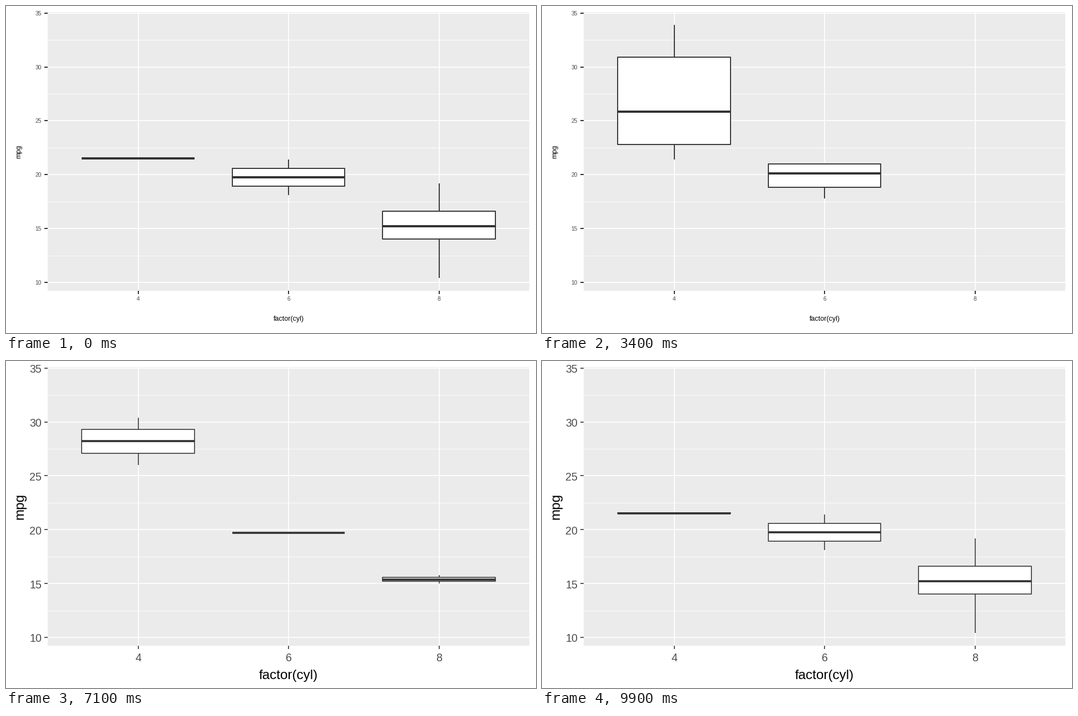
These frames come from a looping animation (953 by 588 pixels, 10000 ms). A matplotlib script:

```python
import math

import matplotlib.pyplot as plt
from matplotlib.animation import FuncAnimation
from matplotlib.patches import Rectangle

W, H, DPI = 953, 588, 100
FRAMES, INTERVAL = 100, 100
LEFT, TOP, RIGHT, BOTTOM = 75.3, 11.3, 940.8, 512.2
STEP = (RIGHT - LEFT) / 3.2
UNIT = 19.38
HALF_BOX = 0.375 * STEP
DARK = "#333333"

# Five-number summaries per gear state: min, lower, median, upper, max.
GEAR3 = {4: [21.5] * 5,
         6: [18.1, 18.925, 19.75, 20.575, 21.4],
         8: [10.4, 14.05, 15.2, 16.625, 19.2]}
GEAR4 = {4: [21.4, 22.8, 25.85, 30.9, 33.9],
         6: [17.8, 18.85, 20.1, 21.0, 21.0]}
GEAR5 = {4: [26.0, 27.1, 28.2, 29.3, 30.4],
         6: [19.7] * 5,
         8: [15.0, 15.2, 15.4, 15.6, 15.8]}
# start frame, length, from, to
TRANSITIONS = [(11, 22, GEAR3, GEAR4),
               (45, 22, GEAR4, GEAR5),
               (79, 21, GEAR5, GEAR3)]
FADE_END = 10 / 22

# Frames drawn in the compact theme; the rest use the large one.
COMPACT = {0, 1, 3, 4, 6, 7, 9, 11, 12, 13, 15, 16, 18, 20, 22,
           25, 28, 31, 34, 38, 45, 70, 95}


def px(size):
    return size * 72 / DPI


def x_at(cyl):
    return LEFT + (0.6 + (cyl - 4) / 2) * STEP


def y_at(mpg):
    return BOTTOM - (mpg - 9.225) * UNIT


def mix(a, b, p):
    return [u + (v - u) * p for u, v in zip(a, b)]


def state_at(frame):
    """Return {cyl: (summary, alpha)} for the frame."""
    current = GEAR3
    for start, length, old, new in TRANSITIONS:
        if frame < start:
            break
        t = (frame - start) / length
        if t >= 1:
            current = new
            continue
        p = (1 - math.cos(math.pi * t)) / 2
        boxes = {}
        for cyl in (4, 6, 8):
            if cyl not in new:      # shrink away to the median
                boxes[cyl] = mix(old[cyl], [old[cyl][2]] * 5, p), 1
            elif cyl not in old:    # fade in
                boxes[cyl] = new[cyl], (p if t < FADE_END else 1)
            else:
                boxes[cyl] = mix(old[cyl], new[cyl], p), 1
        return boxes
    return {cyl: (summary, 1) for cyl, summary in current.items()}


plt.rcParams["font.family"] = "Liberation Sans"
# The tiny margin keeps the pixel size from being rounded down.
fig = plt.figure(figsize=((W + 0.01) / DPI, (H + 0.01) / DPI), dpi=DPI,
                 facecolor="white")
ax = fig.add_axes([0, 0, 1, 1])
ax.set_xlim(0, W)
ax.set_ylim(H, 0)
ax.axis("off")


def line(xs, ys, width, color, z):
    return ax.plot(xs, ys, lw=px(width), color=color, zorder=z,
                   solid_capstyle="butt")[0]


ax.add_patch(Rectangle((LEFT, TOP), RIGHT - LEFT, BOTTOM - TOP,
                       fc="#EBEBEB", ec="none", zorder=0))
for mpg in (12.5, 17.5, 22.5, 27.5, 32.5):
    line([LEFT, RIGHT], [y_at(mpg)] * 2, 0.9, "white", 1)
for mpg in range(10, 36, 5):
    line([LEFT, RIGHT], [y_at(mpg)] * 2, 1.8, "white", 1)
for cyl in (4, 6, 8):
    line([x_at(cyl)] * 2, [TOP, BOTTOM], 1.8, "white", 1)


def build_theme(tick_size, title_size, tick_width, y_drop, x_base,
                title_base, ylab_base):
    """Axis labels and ticks of one theme, as a list of artists."""
    parts = []

    def label(x, y, text, size, color, **kw):
        parts.append(ax.text(x, y, text, fontsize=px(size), color=color,
                             va="baseline", zorder=5, **kw))

    for mpg in range(10, 36, 5):
        y = y_at(mpg)
        label(64, y + y_drop, str(mpg), tick_size, "#4D4D4D", ha="right")
        parts.append(line([69, 75], [y, y], tick_width, DARK, 2))
    for cyl in (4, 6, 8):
        x = x_at(cyl)
        label(x, x_base, str(cyl), tick_size, "#4D4D4D", ha="center")
        parts.append(line([x, x], [512, 518], tick_width, DARK, 2))
    label((LEFT + RIGHT) / 2, title_base, "factor(cyl)", title_size, "black",
          ha="center")
    label(ylab_base, (TOP + BOTTOM) / 2, "mpg", title_size, "black",
          ha="center", rotation=90, rotation_mode="anchor")
    return parts


large = build_theme(19.6, 24.2, 1.6, 8.3, 539.5, 572, 31.5)
compact = build_theme(10.2, 12.5, 2, 4, 530, 566, 26.5)


class Box:
    def __init__(self, cyl):
        x = self.x = x_at(cyl)
        self.whiskers = [line([x, x], [0, 0], 1.6, DARK, 3) for _ in range(2)]
        self.body = Rectangle((x - HALF_BOX, 0), 2 * HALF_BOX, 0, fc="white",
                              ec=DARK, joinstyle="round", zorder=3.5)
        ax.add_patch(self.body)
        self.median = line([x - HALF_BOX, x + HALF_BOX], [0, 0], 3.6, DARK, 4)
        self.parts = [*self.whiskers, self.body, self.median]

    def update(self, summary, alpha, small):
        low, lower, middle, upper, high = map(y_at, summary)
        self.whiskers[0].set_ydata([low, lower])
        self.whiskers[1].set_ydata([upper, high])
        self.body.set_y(upper)
        self.body.set_height(lower - upper)
        self.median.set_ydata([middle, middle])
        for part in self.parts:
            part.set_visible(True)
            part.set_alpha(alpha)
            part.set_linewidth(px(1.9 if small else 1.6))
        self.median.set_linewidth(px(4 if small else 3.7))

    def hide(self):
        for part in self.parts:
            part.set_visible(False)


boxes = {cyl: Box(cyl) for cyl in (4, 6, 8)}


def draw(frame):
    small = frame in COMPACT
    for part in large:
        part.set_visible(not small)
    for part in compact:
        part.set_visible(small)
    state = state_at(frame)
    for cyl, box in boxes.items():
        if cyl in state:
            box.update(*state[cyl], small)
        else:
            box.hide()
    return []


anim = FuncAnimation(fig, draw, frames=FRAMES, interval=INTERVAL,
                     init_func=lambda: draw(0), repeat=True, repeat_delay=0,
                     blit=False)
plt.show()
```
